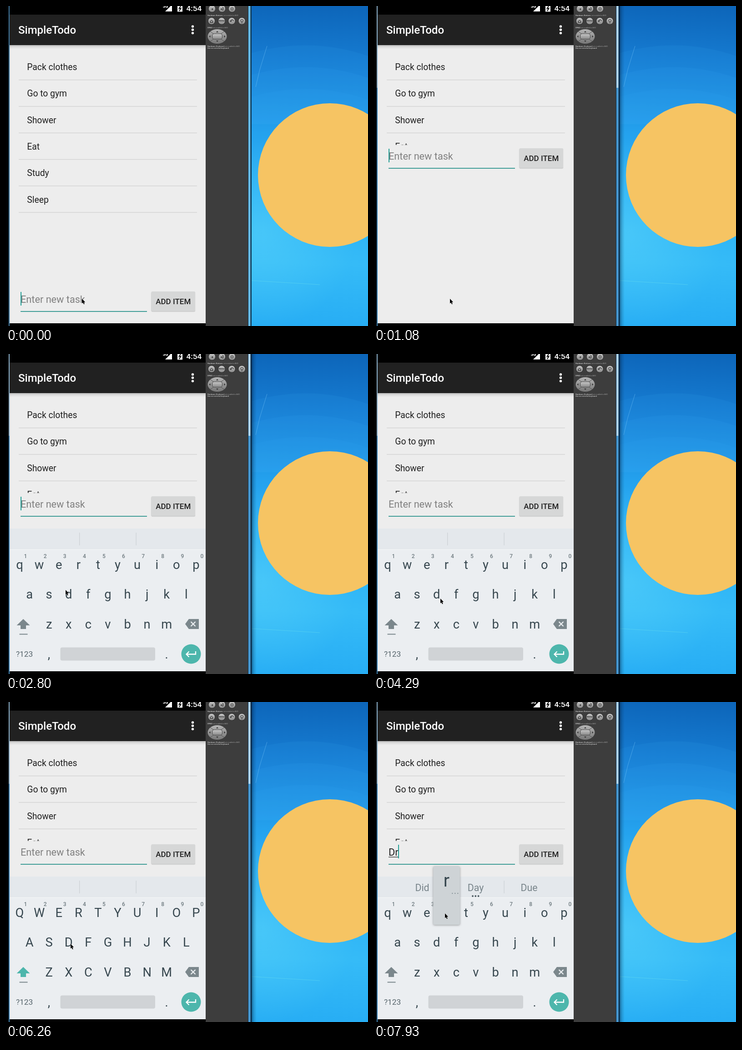
Write an HTML page with a canvas that moves like this. It is 796 px wide and 704 px high and loops after 8 s.

```html
<!DOCTYPE html>
<html lang="en">
<head>
<meta charset="utf-8">
<title>SimpleTodo</title>
<style>
html, body { margin: 0; width: 100%; height: 100%; overflow: hidden; background: #000; }
canvas { display: block; }
</style>
</head>
<body>
<canvas id="stage" width="796" height="704"></canvas>
<script>
const ctx = document.getElementById('stage').getContext('2d');
const LOOP = 8000;
const FRAME = 133.1;
const BLINK = 500;     // caret half period
const INK = '#37474f', TEAL = '#4db6ac', KEY_GREY = '#7b878c';
const PANEL = { x: 8, right: 439, bottom: 698, color: '#ededed' };
const TASKS = ['Pack clothes', 'Go to gym', 'Shower', 'Eat', 'Study', 'Sleep'];
const ROWS = ['qwertyuiop', 'asdfghjkl', 'zxcvbnm'];
const TAP = { start: -230, focus: 1310, shift: 4750, d: 6520, r: 7700 };

// Pointer moves from its resting place.
const REST = { x: 167, y: 644 };
const MOVES = [
  { at: 2090, ms: 600, x: 131, y: 519 },
  { at: 3190, ms: 540, x: 146, y: 538 },
  { at: 4250, ms: 470, x: 42, y: 602 },
  { at: 5200, ms: 900, x: 142, y: 532 },
  { at: 6655, ms: 390, x: 155, y: 457 },
  { at: 7450, ms: 250, x: 156, y: 465 }
];

const clamp = v => Math.max(0, Math.min(1, v));
const smooth = v => v * v * (3 - 2 * v);

function pointerAt(t) {
  return MOVES.reduce((p, m) => {
    const k = smooth(clamp((t - m.at) / m.ms));
    return { x: p.x + (m.x - p.x) * k, y: p.y + (m.y - p.y) * k };
  }, REST);
}

function caretVisible(t) {
  const lastTap = Math.max(...Object.values(TAP).filter(tap => tap <= t));
  return Math.floor((t - lastTap) / BLINK) % 2 === 0;
}

function keyCenter(key) {
  const row = ROWS.findIndex(keys => keys.includes(key));
  const indent = [0, 0.5, 1.5][row];
  return { x: 30 + 43.1 * (ROWS[row].indexOf(key) + indent), y: 463 + 65.5 * row };
}

function rect(x, y, w, h, color) {
  ctx.fillStyle = color;
  ctx.fillRect(x, y, w, h);
}

function roundRect(x, y, w, h, r, color) {
  ctx.fillStyle = color;
  ctx.beginPath();
  ctx.roundRect(x, y, w, h, r);
  ctx.fill();
}

function ellipse(x, y, rx, ry, color) {
  ctx.fillStyle = color;
  ctx.beginPath();
  ctx.ellipse(x, y, rx, ry, 0, 0, Math.PI * 2);
  ctx.fill();
}

const dot = (x, y, r, color) => ellipse(x, y, r, r, color);

function trace(points) {
  ctx.beginPath();
  points.forEach(([x, y]) => ctx.lineTo(x, y));
}

function poly(points, color) {
  trace(points);
  ctx.fillStyle = color;
  ctx.fill();
}

function line(points, color, width) {
  trace(points);
  ctx.strokeStyle = color;
  ctx.lineWidth = width;
  ctx.stroke();
}

function triangle(x, y, halfBase, height, color) {
  poly([[x - halfBase, y + height], [x, y], [x + halfBase, y + height]], color);
}

function text(str, x, y, size, color, { weight = 400, align = 'left', family = 'Roboto' } = {}) {
  ctx.font = `${weight} ${size}px "${family}", sans-serif`;
  ctx.textAlign = align;
  ctx.fillStyle = color;
  ctx.fillText(str, x, y);
  return ctx.measureText(str).width;
}

function fade(x0, y0, x1, y1, ...colors) {
  const g = ctx.createLinearGradient(x0, y0, x1, y1);
  colors.forEach((c, i) => g.addColorStop(i / (colors.length - 1), c));
  return g;
}

function withShadow(blur, alpha, draw) {
  ctx.save();
  ctx.shadowColor = `rgba(0,0,0,${alpha})`;
  ctx.shadowBlur = blur;
  ctx.shadowOffsetY = 1;
  draw();
  ctx.restore();
}

function clipped(x, y, w, h, draw) {
  ctx.save();
  ctx.beginPath();
  ctx.rect(x, y, w, h);
  ctx.clip();
  draw();
  ctx.restore();
}

function drawDesktop() {
  rect(538, 0, 258, 704, fade(610, 0, 590, 704, '#0d66ba', '#1880d6', '#24a2ee', '#2bb0f5', '#35bbf7', '#27adf4'));
  const glow = ctx.createRadialGradient(560, 500, 10, 560, 500, 210);
  glow.addColorStop(0, 'rgba(84,208,250,.6)');
  glow.addColorStop(1, 'rgba(84,208,250,0)');
  rect(538, 280, 258, 424, glow);
  for (let y = 92; y < 200; y += 48) {
    ctx.fillStyle = 'rgba(50,160,235,.12)';
    ctx.beginPath();
    ctx.moveTo(538, y + 12);
    ctx.quadraticCurveTo(670, y - 26, 796, y + 18);
    ctx.lineTo(796, 260);
    ctx.lineTo(538, 260);
    ctx.fill();
  }
  line([[549, 178], [558, 140], [574, 88]], 'rgba(130,205,250,.45)', 1);
  line([[540, 604], [690, 613]], 'rgba(110,225,235,.45)', 1.2);
  dot(712, 372, 158, '#f6c463');
}

function drawWindowFrame(focus) {
  rect(0, 0, 8, 704, '#000');
  rect(6, 0, 1.5, 704, '#5aa5da');
  rect(532, 0, 8, 704, '#0e3550');
  rect(533, 0, 4.5, 704, '#68bbe6');
  ctx.globalAlpha = focus;
  [[6, 1.5], [533, 4.5]].forEach(([x, w]) => {
    rect(x, 0, w, 180, '#b0d3ee');
    rect(x, 180, w, 524, '#4796d0');
  });
  rect(538, 0, 13, 704, fade(538, 0, 551, 0, 'rgba(0,20,45,.7)', 'rgba(0,30,60,.2)', 'rgba(0,30,60,0)'));
  ctx.globalAlpha = 1;
}

function hardwareButton(label, x, y, size) {
  dot(x, y, 8, '#222');
  dot(x, y, 7.3, fade(x, y - 8, x, y + 8, '#c9c9c9', '#858585'));
  text(label, x, y + size * 0.36, size, '#333', { weight: 700, align: 'center', family: 'DejaVu Sans' });
}

function drawSidebar() {
  rect(PANEL.right, 0, 532 - PANEL.right, 704, '#3d3d3d');
  ['◂', '◂)', '⏻'].forEach((label, i) => hardwareButton(label, 453 + i * 22, 6, 8));
  ['⌂', 'MENU', '↶', '⚲'].forEach((label, i) => hardwareButton(label, 452 + i * 22.2, 33, i === 1 ? 4 : 11));

  ellipse(464.5, 67, 21, 16, fade(0, 51, 0, 83, '#b4b4b4', '#777'));
  [-1, 1].forEach(s => line([[449, 67 - 11 * s], [480, 67 + 11 * s]], '#555', 1));
  roundRect(453, 60.5, 23, 13, 5, '#444');
  roundRect(454, 61.5, 21, 11, 4, fade(0, 61, 0, 73, '#c8c8c8', '#888'));
  for (let i = 0; i < 4; i++) {
    ctx.save();
    ctx.translate(464.5, 67);
    ctx.rotate(i * Math.PI / 2);
    triangle(0, i % 2 ? -18 : -12, 2.5, 3, '#333');
    ctx.restore();
  }

  const family = 'Liberation Sans';
  const notice = (bold, rest, y) => {
    const width = text(bold, 443, y, 3.9, '#c4c4c4', { weight: 700, family });
    text(rest, 443 + width, y, 3.9, '#a4a4a4', { family });
  };
  notice('Hardware Buttons', ' not enabled in AVD', 21.5);
  notice('DPAD', ' not enabled in AVD', 49);
  notice('Hardware Keyboard', ' not enabled in AVD', 89.5);
  notice('Use an external keyboard', '', 94);
}

function drawPanel() {
  const { x, right, bottom, color } = PANEL, width = right - x;
  rect(x, 86, width, bottom - 86, color);
  rect(x, bottom, width, 704 - bottom, '#000');
  rect(x, 86, width, 9, fade(0, 86, 0, 95, '#bdbdbd', '#dedede', color));
  rect(x, 0, width, 19, '#000');
  rect(x, 19, width, 67, '#212121');
  text('3G', 345, 3.5, 9, '#fff', { weight: 700 });
  poly([[350, 12], [365, 12], [365, -3]], '#fff');
  rect(377, 0, 11, 12.5, '#fff');
  line([[384, 0], [380.5, 5.5], [384.5, 5], [381, 11]], '#000', 1.8);
  text('4:54', 396.5, 11, 17.2, '#fff', { weight: 500 });
  text('SimpleTodo', 27, 61, 24, '#fff', { weight: 500 });
  for (let i = -1; i <= 1; i++) dot(410.5, 52.3 + i * 7.3, 2.7, '#fff');
}

function drawTasks(bottom) {
  clipped(PANEL.x, 86, 431, bottom - 86, () => TASKS.forEach((task, i) => {
    text(task, 46.3, 141 + i * 58.3, 19.3, '#1f1f1f');
    rect(28, 162 + i * 58.3, 392, 1.2, '#d0d0d0');
  }));
}

function drawEntry(dy, typed, caret) {
  ctx.save();
  ctx.translate(0, dy);
  text(typed || 'Enter new task', 32, 653, 21.7, typed ? '#212121' : '#808080');
  const width = typed ? ctx.measureText(typed).width : 0;
  rect(32, 655.5, width, 1.3, '#333');
  if (caret) rect(Math.floor(32 + width), 629, 2, 30, '#26a097');
  rect(32, 671, 278, 2, '#429e98');
  withShadow(1, 0.2, () => roundRect(319.5, 628, 96.5, 43.5, 2.5, '#d6d7d7'));
  text('ADD ITEM', 367.7, 656, 17, '#212121', { weight: 500, align: 'center' });
  ctx.restore();
}

function drawShift(color) {
  triangle(38, 583, 14.5, 14, color);
  rect(32, 596, 12, 9, color);
  rect(29.5, 615.5, 18, 2, KEY_GREY);
}

function drawBackspace() {
  poly([[394, 594], [402, 583], [424, 583], [424, 605], [402, 605]], KEY_GREY);
  [-5, 5].forEach(s => line([[406.5, 594 - s], [416.5, 594 + s]], '#ebeef1', 2.3));
}

function drawEnter() {
  dot(407, 660, 21.5, TEAL);
  line([[417, 654], [417, 660.5], [397, 660.5]], '#fff', 2.3);
  line([[402.5, 654.5], [396.5, 660.5], [402.5, 666.5]], '#fff', 2.3);
}

function drawKeyboard({ slide, upper, suggest }) {
  const center = { align: 'center' };
  clipped(PANEL.x, 384, 431, PANEL.bottom - 384, () => {
    ctx.translate(0, slide);
    rect(8, 384, 431, 46, '#e4e8ec');
    rect(8, 430, 431, 268, '#ebeef1');
    rect(8, 430, 431, 1, '#f6f8f9');
    [161, 285.5].forEach(x => rect(x, 393, 1.2, 28, '#cbd0d4'));
    if (suggest) {
      ['Did', 'Day', 'Due'].forEach((word, i) => text(word, 106 + i * 117.5, 416, 21.3, '#79858b', center));
      for (let i = -1; i <= 1; i++) dot(223.3 + i * 6.3, 427, 1.9, '#4c5a61');
    }
    for (const key of ROWS.join('')) {
      const { x, y } = keyCenter(key);
      text(upper ? key.toUpperCase() : key, x, y + 9.5, 27.3, INK, center);
    }
    for (let i = 0; i < 10; i++) {
      text((i + 1) % 10, 43 + i * 43.1, 448.5, 12, '#6f7b80', { weight: 500, align: 'center' });
    }
    drawShift(upper ? TEAL : KEY_GREY);
    drawBackspace();
    text('?123', 40.5, 666, 17.2, '#56646b', center);
    text(',', 94.5, 670, 27, INK, center);
    text('.', 353, 670, 27, INK, center);
    roundRect(119.5, 645.5, 208.5, 29, 4, '#d0d3d6');
    drawEnter();
  });
}

function drawKeyPopup(label) {
  const { x, y } = keyCenter(label.toLowerCase());
  withShadow(4, 0.35, () => roundRect(x - 29, y - 101.5, 58.5, 128.5, 3, '#ced3d6'));
  text(label, x, y - 57.5, 39, INK, { align: 'center' });
  for (let i = 0; i < 3; i++) dot(x + 13 + i * 6, y - 42, 1.2, '#89959a');
}

function drawPointer({ x, y }) {
  ctx.save();
  ctx.translate(Math.round(x), Math.round(y));
  const arrow = [[0, 0], [0, 10.5], [2.3, 8.4], [4, 12.2], [5.8, 11.4], [4.1, 7.7], [7.2, 7.5], [0, 0]];
  line(arrow, 'rgba(255,255,255,.85)', 1);
  poly(arrow, '#000');
  ctx.restore();
}

function render(time) {
  const t = Math.floor(time / FRAME) * FRAME;
  const since = tap => t - TAP[tap];
  const compact = t > 1060;
  const typed = since('r') > 130 ? 'Dr' : since('d') > 130 ? 'D' : '';

  drawDesktop();
  drawWindowFrame(clamp((t - 530) / 400));
  drawSidebar();
  drawPanel();
  drawTasks(compact ? 305.5 : 620);
  drawEntry(compact ? -315 : 0, typed, caretVisible(t));
  if (t > 1190) {
    drawKeyboard({
      slide: 100 * clamp((1330 - t) / FRAME),
      upper: since('shift') >= 0 && !typed,
      suggest: since('d') > 260
    });
  }
  if (since('d') >= 0 && since('d') < 260) drawKeyPopup('D');
  if (since('r') >= 0) drawKeyPopup('r');
  drawPointer(pointerAt(t));
}

function tick() {
  render(performance.now() % LOOP);
  requestAnimationFrame(tick);
}
tick();
</script>
</body>
</html>
```
